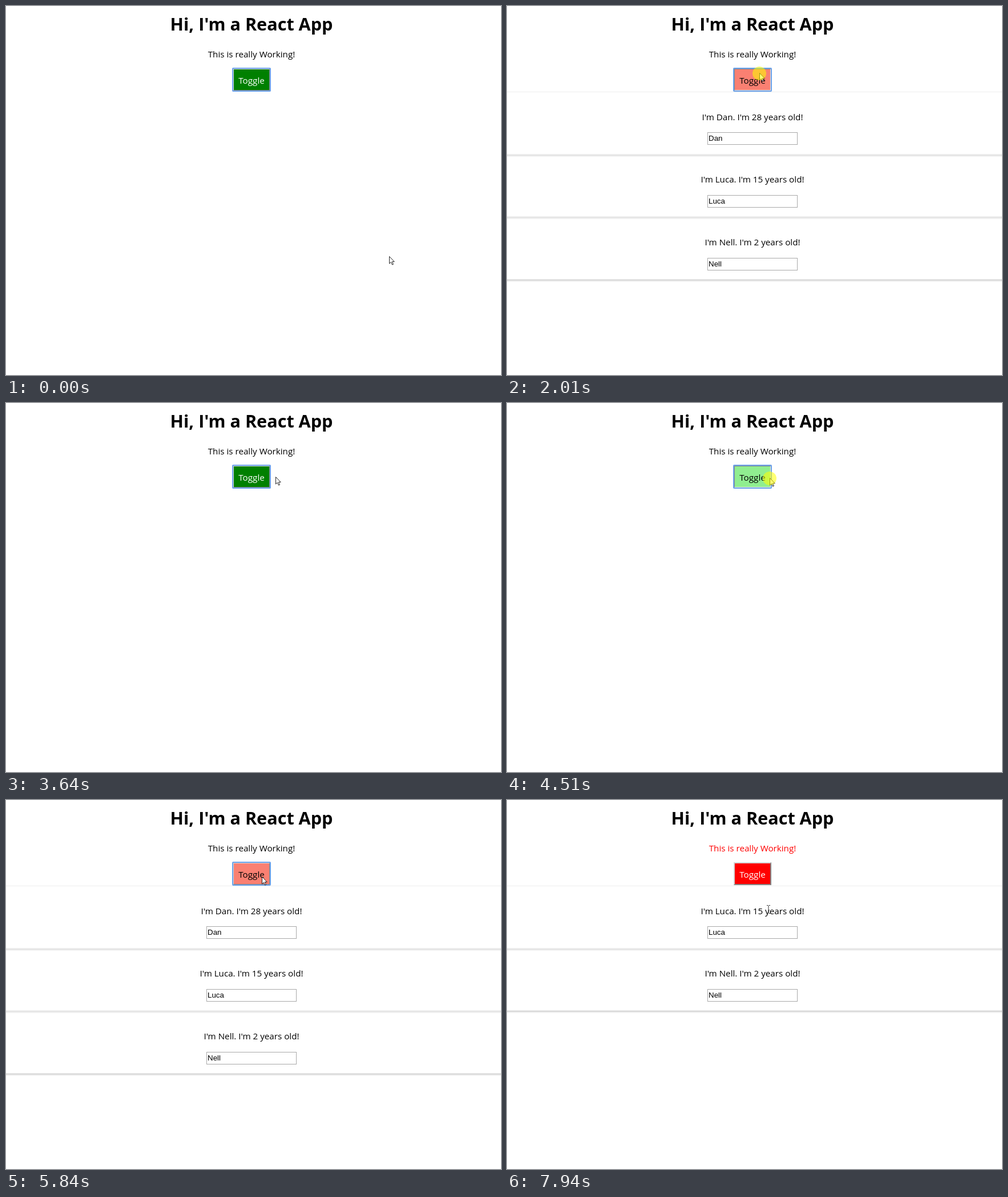
An HTML page that plays this animation: 867 px wide and 646 px high, repeating every 8000 ms.

```html
<!DOCTYPE html>
<html lang="en">
<head>
<meta charset="utf-8">
<title>Toggle demo</title>
<style>
  html, body { margin: 0; width: 100%; height: 100%; overflow: hidden; background: #fff; }
  #stage { position: relative; width: 867px; height: 646px; overflow: hidden; }
  #stage > *, .card, .field { position: absolute; box-sizing: border-box; }
  svg { left: 0; top: 0; }
  text { font: 15.2px "Open Sans", "Noto Sans", sans-serif; text-anchor: middle; }
  #title { font-size: 30.6px; font-weight: 700; }
  .card { left: -10px; width: 890px; height: 109.7px; border: 1px solid #eee; box-shadow: 0 2px 3px #ccc; }
  .field { left: 351px; width: 158px; height: 22px; border: 1px solid #a9a9a9; }
  text.value { font: 13.33px "Liberation Sans", Arial, sans-serif; text-anchor: start; }
  #button { left: 397px; top: 109px; width: 66px; height: 40px; border: 2px solid;
    border-color: #d4d4d4 #858585 #858585 #d4d4d4; }
  #button.pressed { border-color: #858585 #e4e4e4 #e4e4e4 #858585; }
  #button.focus { outline: 2px solid #6ca2ea; outline-offset: -1px; border-radius: 1px; }
</style>
</head>
<body>
<div id="stage">
  <div id="cards"></div>
  <div id="button"></div>
  <svg width="867" height="646">
    <text id="title" x="430" y="43">Hi, I'm a React App</text>
    <text id="note" x="430" y="90">This is really Working!</text>
    <text id="label" x="430" y="136">Toggle</text>
    <g id="lines"></g>
    <g id="pointer">
      <path id="arrow" d="M.5 .5V13L3.4 10.3L5.5 15L7.4 14.2L5.4 9.6H9.2Z" fill="#fff" stroke="#111" stroke-width=".9"/>
      <path id="beam" d="M-3 -6.5H-1L0 -5.5L1 -6.5H3M0 -5.5V6.5M-3 7.5H-1L0 6.5L1 7.5H3" fill="none" stroke="#333"/>
      <circle id="halo" r="12" cy="1" fill="#ff0" fill-opacity=".55"/>
    </g>
  </svg>
</div>
<script>
const LOOP = 8000;
const $ = id => document.getElementById(id);
const people = [['Dan', 28], ['Luca', 15], ['Nell', 2]];

// Mouse presses: [down, up]
const presses = [[1060, 1240], [2010, 2180], [4510, 4600], [7380, 7540]];

// Pointer moves: [start, end, steps, path]
const moves = [
  [0, 0, 1, [[671, 438]]],
  [610, 910, 5, [[655, 415], [590, 325], [500, 195], [452, 128], [442, 118]]],
  [1690, 1690, 1, [[442, 117]]],
  [2470, 2930, 7, [[452, 120], [483, 125], [450, 125]]],
  [3080, 3400, 5, [[466, 125], [494, 128], [452, 127]]],
  [3560, 3790, 4, [[464, 127], [472, 129], [470, 130], [457, 130]]],
  [4030, 4110, 2, [[472, 130], [460, 131]]],
  [4980, 5050, 2, [[476, 129], [517, 127]]],
  [5220, 5990, 11, [[512, 127], [458, 132], [472, 136], [460, 138], [448, 134], [446, 131]]],
  [6080, 6450, 6, [[456, 130], [477, 130], [452, 130]]],
  [6600, 7060, 7, [[460, 138], [470, 161], [458, 191]]]
];

function pointerAt(t) {
  const [start, end, steps, path] = moves.findLast(move => t >= move[0]);
  const gaps = steps - 1;
  const progress = gaps ? Math.min(1, Math.floor((t - start) / (end - start) * gaps + 1e-6) / gaps) : 0;
  const place = progress * (path.length - 1);
  const i = Math.floor(place), a = path[i], b = path[i + 1] || a;
  return a.map((v, axis) => Math.round(v + (b[axis] - v) * (place - i)));
}

let shown = '';
function showPeople(list) {
  const key = list.join();
  if (key === shown) return;
  shown = key;
  $('cards').innerHTML = list.map((_, i) =>
    `<div class="card" style="top:${150 + 109.7 * i}px"></div>
     <div class="field" style="top:${221 + 110 * i}px"></div>`).join('');
  $('lines').innerHTML = list.map(([name, age], i) =>
    `<text x="430" y="${Math.floor(200 + 109.6 * i)}">I'm ${name}. I'm ${age} years old!</text>
     <text class="value" x="353" y="${236 + 110 * i}">${name}</text>`).join('');
}

function draw(t) {
  const [x, y] = pointerAt(t);
  const open = (t >= 1240 && t < 2180) || t >= 4600;
  const removed = t >= 7540;
  const pressed = presses.some(([down, up]) => t >= down && t < up);
  const hover = x >= 397 && x <= 466 && y >= 109 && y < 149;
  const typing = y >= 184 && y < 205 && open;

  showPeople(open ? people.slice(removed ? 1 : 0) : []);
  $('note').setAttribute('fill', removed ? 'red' : 'black');
  $('label').setAttribute('fill', hover ? 'black' : 'white');
  $('button').style.background = open ? (hover ? 'salmon' : 'red') : (hover ? 'lightgreen' : 'green');
  $('button').classList.toggle('pressed', pressed && hover);
  $('button').classList.toggle('focus', t < 7380);
  $('pointer').setAttribute('transform', `translate(${x} ${y})`);
  $('arrow').style.display = typing ? 'none' : '';
  $('beam').style.display = typing ? '' : 'none';
  $('halo').style.display = pressed ? '' : 'none';
}

const begin = performance.now();
function tick() {
  draw((performance.now() - begin) % LOOP);
  requestAnimationFrame(tick);
}
tick();
</script>
</body>
</html>
```
